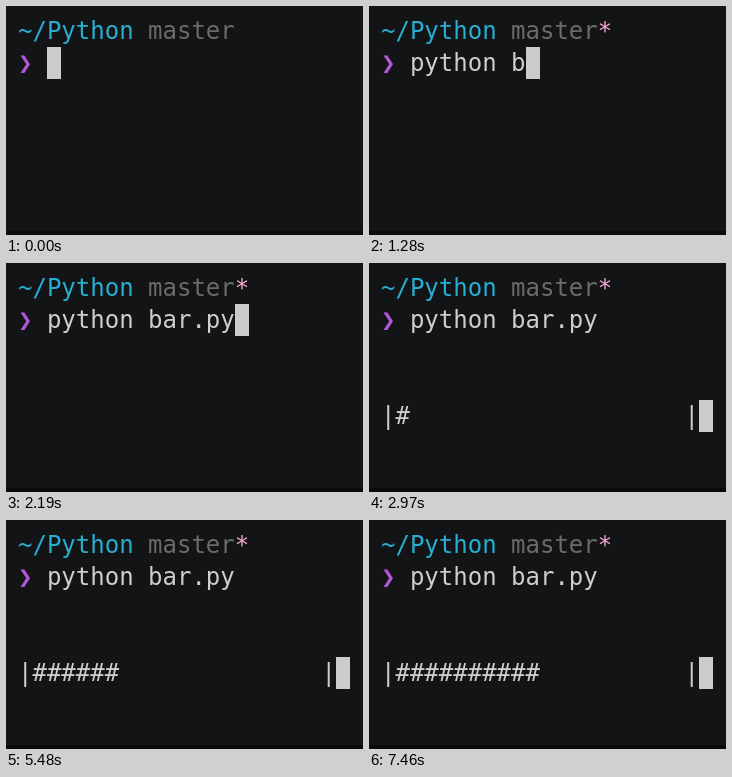
Animation, 357 px wide and 229 px high, one loop 7.99 s. Source, as an HTML page with a canvas:

```html
<!DOCTYPE html>
<html lang="en">
<head>
<meta charset="utf-8">
<title>Terminal progress bar</title>
<style>
  html, body { margin: 0; width: 100%; height: 100%; overflow: hidden; background: #121415; }
  canvas { display: block; }
</style>
</head>
<body>
<canvas id="stage" width="357" height="229"></canvas>
<script>
const ctx = document.getElementById('stage').getContext('2d');
const LOOP = 7990, LEFT = 12, TOP = 9, CELL = 14.45, ROW = 32;
const COMMAND = 'python bar.py', SLOTS = 20;
const COLORS = {
  back: '#121415', edge: '#0d090a', path: '#29aed3', branch: '#6b6b6c',
  dirty: '#f3a9cf', prompt: '#b456dc', text: '#cccecf', cursor: '#cccccc'
};

// [time, typed characters]
const KEYS = [[590, 1], [780, 2], [910, 3], [970, 4], [1030, 5], [1090, 6],
  [1280, 8], [1410, 9], [1470, 10], [1870, 11], [2130, 12], [2190, 13]];
const ENTER = 2450, BAR = 2510;

const colX = col => LEFT + col * CELL;

function write(text, col, row, color) {
  ctx.fillStyle = color;
  ctx.fillText(text, colX(col), TOP + row * ROW + 24);
}

function cursor(col, row) {
  const x = Math.round(colX(col));
  ctx.fillStyle = COLORS.cursor;
  ctx.fillRect(x - (col === 2 ? 0 : 0), TOP + row * ROW, 14, ROW);
}

function typedAt(t) {
  let count = 0;
  for (const [time, n] of KEYS) if (t >= time) count = n;
  return count;
}

// Bar steps alternate between 530 and 460 ms after the first one.
function filledAt(t) {
  let n = 0;
  for (let next = 2970; t >= next; next += n % 2 ? 530 : 460) n++;
  return n;
}

function draw(t) {
  ctx.fillStyle = COLORS.back;
  ctx.fillRect(0, 0, 357, 229);
  ctx.fillStyle = COLORS.edge;
  ctx.fillRect(0, 225, 357, 4);

  ctx.font = '24px "DejaVu Sans Mono", monospace';
  ctx.textBaseline = 'alphabetic';
  write('~/Python', 0, 0, COLORS.path);
  write('master', 9, 0, COLORS.branch);
  if (t >= 60) write('*', 15, 0, COLORS.dirty);
  write('❯', 0, 1, COLORS.prompt);

  const typed = typedAt(t);
  write(COMMAND.slice(0, typed), 2, 1, COLORS.text);

  if (t < ENTER) cursor(2 + typed, 1);
  else if (t < BAR) cursor(0, 2);
  else {
    write('|' + '#'.repeat(filledAt(t)).padEnd(SLOTS) + '|', 0, 4, COLORS.text);
    cursor(SLOTS + 2, 4);
  }
}

function frame() {
  draw(performance.now() % LOOP);
  requestAnimationFrame(frame);
}
frame();
</script>
</body>
</html>
```
